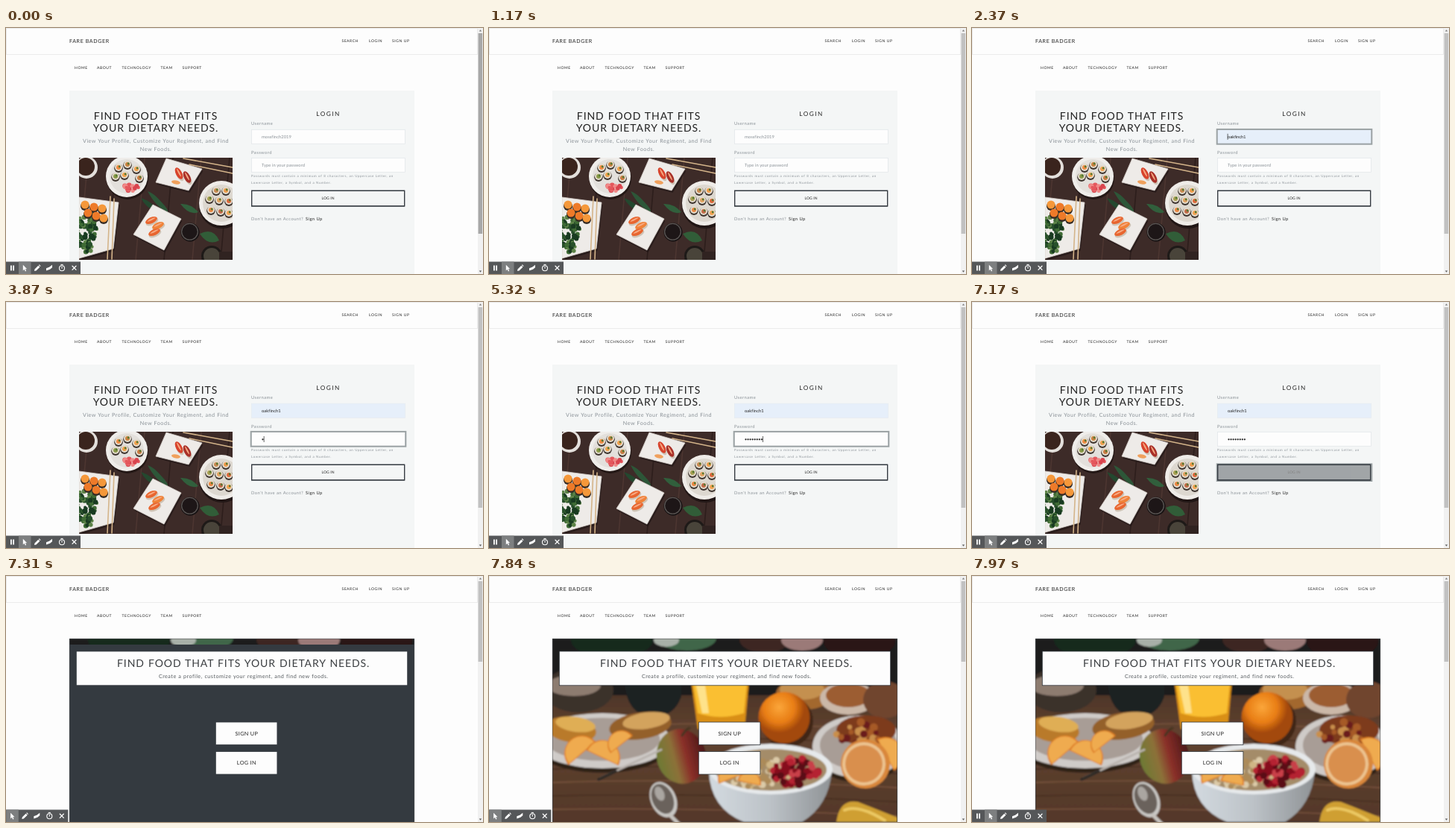
Recreate the animation shown at these times as an HTML page. Size 640x330 px, loop 8 s.

```html
<!DOCTYPE html>
<html lang="en">
<head>
<meta charset="utf-8">
<title>Login demo</title>
<style>
  html, body { margin: 0; width: 100%; height: 100%; overflow: hidden; background: #fdfdfd; }
  svg { display: block; width: 640px; height: 330px; }
  text { font-family: Lato, "Open Sans", sans-serif; fill: #222; white-space: pre; text-rendering: geometricPrecision; }
  .brand { font-size: 7px; letter-spacing: .65px; }
  .nav { font-size: 5px; letter-spacing: .56px; }
  .head { font-size: 14px; letter-spacing: .92px; word-spacing: .5px; }
  .lead { font-size: 7.2px; letter-spacing: .47px; word-spacing: .4px; }
  .title { font-size: 8.2px; letter-spacing: 1.5px; }
  .label { font-size: 5.8px; letter-spacing: .45px; }
  .field { font-size: 5.8px; letter-spacing: .06px; }
  .help { font-size: 4.4px; letter-spacing: .58px; word-spacing: .25px; }
  .small { font-size: 5px; letter-spacing: .1px; }
  .button { font-size: 7.2px; letter-spacing: .35px; }
  .preview { font: 5.7px "Liberation Sans", Arial, sans-serif; }
  .gray { fill: #899096; }
  .mid { text-anchor: middle; }
</style>
</head>
<body>
<svg id="stage" viewBox="0 0 640 330" xmlns="http://www.w3.org/2000/svg"></svg>
<script>
const rect = (x, y, w, h, fill, more = '') => `<rect x="${x}" y="${y}" width="${w}" height="${h}" fill="${fill}" ${more}/>`;
const disc = (x, y, r, fill, more = '') => `<circle cx="${x}" cy="${y}" r="${r}" fill="${fill}" ${more}/>`;
const oval = (x, y, rx, ry, fill, turn = 0) =>
  `<ellipse cx="${x}" cy="${y}" rx="${rx}" ry="${ry}" fill="${fill}" transform="rotate(${turn} ${x} ${y})"/>`;
const path = (d, fill, more = '') => `<path d="${d}" fill="${fill}" ${more}/>`;
const line = (d, color, width) => path(d, 'none', `stroke="${color}" stroke-width="${width}" stroke-linecap="round"`);
const text = (x, y, cls, s, more = '') => `<text x="${x}" y="${y}" class="${cls}" ${more}>${s}</text>`;
const group = (id, body, more = '') => `<g id="${id}" ${more}>${body}</g>`;
const repeat = (n, draw) => Array.from({ length: n }, (_, i) => draw(i)).join('');

function seeded(seed) {
  return () => (seed = (seed * 16807) % 2147483647) / 2147483647;
}

// Random blobs inside an ellipse, for greens, berries and crumbs.
function scatter(n, x, y, rx, ry, size, colors, seed) {
  const rnd = seeded(seed);
  return repeat(n, i => {
    const a = rnd() * 6.283, d = Math.sqrt(rnd());
    return disc((x + rx * d * Math.cos(a)).toFixed(1), (y + ry * d * Math.sin(a)).toFixed(1),
      (size * (.6 + .6 * rnd())).toFixed(1), colors[i % colors.length]);
  });
}

const roll = (x, y, core) =>
  disc(x, y + 1.2, 5.8, '#3d342f') + disc(x, y, 5, '#e4dccd') + disc(x, y, 3, core) + disc(x + 1.2, y - 1, 1.4, '#557a35');
const nigiri = (x, y, turn, color) =>
  oval(x + 1, y + 2, 9, 4.2, '#cfc4b6', turn) + oval(x, y, 8.5, 4, color, turn) + oval(x, y - 1, 6, 1, '#f6a982', turn);

function sushiPhoto() {
  const stick = d => line(d, '#d4b48a', 1.6);
  const plate = d => path(d, '#1e1514', 'transform="translate(1.5 3)" opacity=".6"') + path(d, '#eeebe8', 'stroke="#d7d1cc" stroke-width=".8"');
  return rect(98, 174, 206, 137, '#3d2b28') +
    repeat(6, i => line(`M${110 + i * 38} 174L${98 + i * 38} 311`, i % 2 ? '#2d1e1c' : '#4d3631', 1.6)) +
    disc(108, 187, 15, '#e3dfdb') + disc(107, 186, 12, '#3a241d') +
    disc(163, 202, 28, '#241816') + disc(162, 199, 28, '#efedea') + disc(162, 199, 23, '#e3e0dc') +
    roll(151, 187, '#ef8b42') + roll(163, 183, '#c9823f') + roll(175, 189, '#f0a04e') +
    roll(147, 199, '#8b9a4a') + roll(159, 197, '#efa14b') + roll(179, 201, '#c97b42') +
    scatter(16, 168, 214, 10, 5, 3, ['#e4575c', '#f08a88', '#d9444e'], 7) +
    plate('M215 175L263 189L245 218L201 207Z') +
    nigiri(232, 195, 62, '#d8432c') + nigiri(243, 200, 62, '#a93029') + oval(228, 207, 6, 2.5, '#f0a05c', 10) +
    stick('M238 175L304 187') + stick('M246 183L304 195') +
    path('M190 219Q198 221 209 234Q218 243 217 247Q201 240 190 219Z', '#2d5638') +
    path('M181 228Q194 232 206 245L200 246Q187 240 181 228Z', '#24482f') +
    path('M234 236Q248 235 258 247Q246 252 234 236Z', '#315f3c') +
    disc(290, 238, 31, '#211615') + disc(289, 235, 30, '#efece8') + disc(289, 235, 25, '#ddd8d0') +
    roll(282, 218, '#c98a52') + roll(295, 218, '#ef9c4c') + roll(273, 229, '#a7a052') +
    roll(286, 231, '#e1a261') + roll(299, 232, '#dc693c') + roll(275, 244, '#ea8742') +
    roll(288, 246, '#c36b48') + roll(299, 248, '#f1a251') +
    plate('M98 227L151 234L144 296L98 309Z') +
    scatter(80, 109, 274, 14, 28, 3.2, ['#28502b', '#3f6b35', '#193b21', '#5d8348'], 31) +
    [[106, 237], [118, 240], [129, 242], [121, 252], [131, 255], [110, 248]].map(([x, y], i) =>
      disc(x, y + 2, 6, '#342a24') + disc(x, y, 5.5, i % 2 ? '#ee7a29' : '#f5983a')).join('') +
    plate('M197 237L235 256L212 298L171 277Z') +
    nigiri(195, 258, -25, '#e8652f') + nigiri(204, 265, -25, '#f08238') + nigiri(199, 274, -25, '#e8652f') +
    stick('M140 226L136 310') + stick('M145 229L142 310') +
    disc(247, 274, 12.5, '#151112') + disc(246.5, 273.3, 11.5, '#5b5654') + disc(246.5, 273.3, 10.2, '#1d1617') +
    path('M260 276Q278 267 286 285Q271 293 260 276Z', '#315d38') +
    disc(276, 306, 14, '#1e1a18') + disc(276, 306, 11, '#49443a') +
    rect(286, 300, 18, 11, '#302321');
}

function breakfastPhoto() {
  const platter = (x, y, rx, ry) => oval(x, y + 6, rx, ry, '#2e2019') + oval(x, y, rx, ry, '#cfcbc8') + oval(x, y - 2, rx * .84, ry * .78, '#a89d96');
  const slice = (x, y, r, turn) =>
    `<g transform="translate(${x} ${y}) rotate(${turn})">` +
    path(`M${-r} 0A${r} ${r} 0 0 1 ${r} 0Z`, '#dd7a20') + path(`M${2 - r} -1A${r - 3} ${r - 3} 0 0 1 ${r - 2} -1Z`, '#efab50') + '</g>';
  return rect(85, 84, 463, 246, 'url(#wood)') +
    repeat(9, i => line(`M85 ${205 + i * 18}Q300 ${190 + i * 20} 548 ${208 + i * 19}`, i % 2 ? '#442b1e' : '#7b553d', 1.3)) +
    rect(85, 84, 463, 76, '#1f1b1a') +
    oval(165, 86, 55, 24, '#14291d') + oval(265, 84, 40, 16, '#3f6649') + oval(238, 86, 17, 9, '#a8b0a8') +
    oval(370, 85, 34, 18, '#3c2622') + oval(420, 86, 28, 14, '#9b7a78') + oval(497, 87, 48, 25, '#2a1418') +
    oval(120, 153, 47, 30, '#3b302a') + oval(114, 147, 36, 14, '#8d7c70') +
    path('M181 140H258V162Q248 190 218 189Q185 187 181 140Z', '#1f2021') +
    oval(424, 158, 39, 21, '#a3682f') + oval(420, 152, 30, 14, '#c4904f') +
    oval(482, 164, 38, 22, '#cbb8a8') + oval(482, 160, 30, 16, '#9c5d33') +
    oval(531, 166, 29, 25, '#6f442f') +
    platter(152, 221, 92, 37) +
    oval(110, 206, 34, 17, '#b97a2c', 8) + oval(116, 199, 27, 10, '#dfae55', 8) +
    oval(203, 201, 42, 18, '#94602c', -8) + oval(211, 194, 32, 11, '#d3a35d', -8) +
    slice(125, 238, 24, -40) + slice(152, 244, 24, 25) + slice(178, 226, 19, -38) +
    path('M271 140H349L343 206Q309 218 280 205Z', '#d98f16') +
    path('M274 145H346L342 184Q310 194 280 184Z', '#fabf30') + path('M278 147H290L295 184H286Z', '#fee28b') +
    disc(400, 195, 35, '#3f2618') + disc(396, 190, 34.5, 'url(#orange)') +
    oval(258, 242, 33, 37, 'url(#apple)', -15) + line('M259 214Q264 206 269 204', '#473422', 3) +
    line('M150 271L231 233', '#b9b3ae', 3) + line('M147 273L170 262', '#2f2b28', 4) +
    platter(496, 229, 62, 42) +
    oval(506, 207, 40, 20, '#7d3a1f') + scatter(22, 498, 210, 33, 15, 5, ['#a65a26', '#c98f4c', '#6b1d1a'], 17) +
    slice(532, 240, 24, 62) + disc(505, 252, 33, '#d9873a') + disc(503, 252, 29, '#ecc491') + disc(503, 252, 25, '#d98f4e') +
    path('M295 262Q297 312 342 330H420Q456 308 460 262Z', 'url(#bowl)') +
    oval(378, 259, 83, 34, '#e6e9eb') + oval(378, 260, 75, 28, '#a48c69') +
    scatter(120, 358, 263, 50, 20, 4, ['#cfb585', '#ac8a58', '#dccaa8'], 53) +
    slice(325, 272, 18, -22) + slice(349, 278, 16, 12) +
    scatter(55, 411, 262, 31, 19, 5, ['#860f1f', '#b52330', '#5a0d17', '#c93f48'], 91) +
    oval(234, 300, 17, 25, '#c9c7c4', -24) + oval(233, 299, 14, 21, '#6a625c', -24) + oval(229, 292, 6, 10, '#aaa6a1', -24) +
    line('M243 321L256 334', '#c6c2bd', 5) +
    path('M467 325Q472 299 495 303L548 324V330H466Z', '#cf9f31') + line('M477 314Q496 306 531 328', '#ecc964', 4);
}

function scrollbar(id, height, color) {
  return rect(633, 0, 7, 330, '#f1f1f1') + path('M634.8 4.5h3.4l-1.7-2.3z', '#777') + path('M634.8 325.5h3.4l-1.7 2.3z', '#555') +
    rect(633.6, 7, 5.6, height, color, `id="${id}"`);
}

function header() {
  const links = [[450.4, 'SEARCH'], [487, 'LOGIN'], [518, 'SIGN UP']];
  const menu = [[92, 'HOME'], [122, 'ABOUT'], [155.5, 'TECHNOLOGY'], [207.5, 'TEAM'], [236.6, 'SUPPORT']];
  return rect(.5, .5, 632, 35, '#fdfdfd', 'stroke="#ebebeb" stroke-width="1"') +
    text(85, 20, 'brand', 'FARE BADGER') +
    links.map(([x, s]) => text(x, 19.4, 'nav', s)).join('') +
    menu.map(([x, s]) => text(x, 54.5, 'nav', s)).join('');
}

const field = y => rect(329.5, y, 206, 19, '#fdfdfd', 'stroke="#e3e7ea" stroke-width=".8"');
const ring = (id, y, h) => rect(328.7, y, 207.6, h, 'none', `id="${id}" stroke="#9ba2a4" stroke-width="2"`);
const caret = (id, x, y) => rect(x, y, .7, 8, '#222', `id="${id}"`);

function loginPage() {
  return rect(85, 84, 463, 246, '#f4f6f6') +
    text(201, 123.3, 'head mid', 'FIND FOOD THAT FITS') +
    text(201, 139.3, 'head mid', 'YOUR DIETARY NEEDS.') +
    text(201, 153.7, 'lead gray mid', 'View Your Profile, Customize Your Regiment, and Find') +
    text(201, 164.6, 'lead gray mid', 'New Foods.') +
    `<g clip-path="url(#sushiClip)"><g filter="url(#fine)">${sushiPhoto()}</g></g>` +
    text(432.6, 118.4, 'title mid', 'LOGIN') +
    text(329, 130.4, 'label gray', 'Username') + field(136.3) +
    text(343, 147.8, 'field gray', 'mossfinch2019', 'id="userHint"') +
    group('filled', rect(329.5, 136.3, 206, 19, '#e6effa')) +
    text(343, 147.8, 'preview', 'oakfinch1', 'id="userPreview"') +
    text(343, 147.8, 'field', 'oakfinch1', 'id="userValue"') +
    ring('userRing', 135.9, 19.8) + caret('userCaret', 342.7, 141.8) +
    text(329, 168.6, 'label gray', 'Password') + field(174.3) +
    text(343, 185.8, 'field gray', 'Type in your password', 'id="passHint"') +
    group('dots', repeat(8, i => disc(344.5 + i * 3.05, 184.3, 1.15, '#222'))) +
    ring('passRing', 173.9, 19.8) + caret('passCaret', 343, 180) +
    text(329, 200.2, 'help gray', 'Passwords must contain a minimum of 8 characters, an Uppercase Letter, an') +
    text(329, 208.8, 'help gray', 'Lowercase Letter, a Symbol, and a Number.') +
    ring('buttonRing', 217.4, 22.6) +
    rect(329.6, 218.3, 205, 20.6, '#f4f6f6', 'stroke="#343a40" stroke-width="1.2"') +
    text(432, 230.3, 'small mid', 'LOG IN') +
    group('hovered', rect(329.6, 218.3, 205, 20.6, '#343a40') +
      text(432, 230.3, 'small mid', 'LOG IN', 'style="fill:#fff"')) +
    rect(329.6, 218.3, 205, 20.6, 'none', 'stroke="#343a40" stroke-width="1.2"') +
    text(329, 258, 'label gray', "Don't have an Account?") + text(402, 258, 'label', 'Sign Up') +
    scrollbar('loginThumb', 269, '#c1c1c1');
}

function homePage() {
  const box = (x, y, w, h) => rect(x, y, w, h, '#fdfdfd', 'stroke="#343a40" stroke-width=".8"');
  return rect(85, 84, 463, 246, '#343a40') +
    `<g clip-path="url(#homeClip)"><g filter="url(#soft)">${breakfastPhoto()}</g></g>` +
    path('M85.3 330V84.3H547.7V330', 'none', 'stroke="#4a4d4f" stroke-width=".6"') +
    box(94.3, 101, 444.4, 45.8) +
    text(318.7, 122.3, 'head mid', 'FIND FOOD THAT FITS YOUR DIETARY NEEDS.', 'style="fill:#3c3f42"') +
    text(318.7, 136.8, 'lead mid', 'Create a profile, customize your regiment, and find new foods.', 'style="fill:#555a5e"') +
    box(281.3, 196, 82.6, 30.3) + text(322.8, 213.8, 'button mid', 'SIGN UP') +
    box(281.3, 235.5, 82.6, 30.5) + text(322.8, 253.4, 'button mid', 'LOG IN') +
    scrollbar('homeThumb', 108, '#c1c1c1');
}

function toolbar() {
  return rect(0, 313.5, 100, 16.5, '#555759') +
    rect(17, 313.5, 16.5, 16.5, '#7d7f80') +
    rect(6, 318.5, 1.8, 7, '#fff') + rect(9.2, 318.5, 1.8, 7, '#fff') +
    path('M22.8 317.8V325.5L24.6 323.8L25.9 326.6L27.2 326L25.9 323.3H28.2Z', '#fff') +
    path('M38 326L38.5 323.5L43.3 318.7L45.4 320.8L40.5 325.6ZM43.9 318L44.8 317.3L46.6 319.2L45.9 320.1Z', '#fff') +
    path('M54 325.5V322.2L58 320.8L62 317.7V321.2L59 323.8Z', '#fff') +
    `<circle cx="75" cy="322.3" r="3.5" fill="none" stroke="#fff" stroke-width="1.1"/>` +
    line('M73.8 317.4H76.2M75 322.3V320.3', '#fff', 1) +
    line('M89 319.3L94 324.4M94 319.3L89 324.4', '#fff', 1.3);
}

const defs = `<defs>
  <clipPath id="sushiClip"><rect x="98" y="174" width="206" height="137"/></clipPath>
  <clipPath id="homeClip"><rect id="loaded" x="85" y="84" width="463" height="8"/></clipPath>
  <filter id="fine"><feGaussianBlur stdDeviation=".5"/></filter>
  <filter id="soft"><feGaussianBlur stdDeviation="1.2"/></filter>
  <linearGradient id="wood" x2="0" y2="1"><stop stop-color="#33241d"/><stop offset=".5" stop-color="#5f412f"/><stop offset="1" stop-color="#54382a"/></linearGradient>
  <linearGradient id="bowl"><stop stop-color="#d3dae0"/><stop offset=".5" stop-color="#bcc2c7"/><stop offset="1" stop-color="#8f9396"/></linearGradient>
  <radialGradient id="orange" cx=".4" cy=".3"><stop stop-color="#fba63a"/><stop offset=".6" stop-color="#e87d14"/><stop offset="1" stop-color="#a3480c"/></radialGradient>
  <linearGradient id="apple"><stop stop-color="#6d7a34"/><stop offset=".35" stop-color="#8c7139"/><stop offset=".6" stop-color="#8a3029"/><stop offset="1" stop-color="#4b1718"/></linearGradient>
</defs>`;

document.getElementById('stage').innerHTML = defs + rect(0, 0, 640, 330, '#fdfdfd') + header() +
  group('login', loginPage()) + group('home', homePage()) + group('toolbar', toolbar());

const LOOP = 8000;
const keyTimes = [3870, 4030, 4200, 4370, 4540, 4890, 5100, 5320];
const el = Object.fromEntries([...document.querySelectorAll('#stage [id]')].map(e => [e.id, e]));
const dots = [...el.dots.children];
const show = (e, on) => { e.style.opacity = +on; };

// The recording shows each fade in three held steps.
const fade = (t, from, to) => {
  const steps = Math.floor((t - from) / (to - from) * 2) + 1;
  return Math.min(3, Math.max(0, steps)) / 3;
};

function render(t) {
  const onHome = t >= 7310;
  el.login.style.display = onHome ? 'none' : '';
  el.home.style.display = onHome ? '' : 'none';

  show(el.userHint, t < 2370);
  show(el.filled, t >= 2370);
  show(el.userPreview, t >= 2370 && t < 2750);
  show(el.userValue, t >= 2750);
  show(el.userCaret, t >= 1710 && t < 2750);
  show(el.userRing, fade(t, 1710, 2010) - fade(t, 3120, 3410));

  const typed = keyTimes.filter(k => t >= k).length;
  dots.forEach((d, i) => show(d, i < typed));
  show(el.passHint, typed === 0);
  show(el.passCaret, t >= 3120 && t < 6290);
  el.passCaret.setAttribute('x', 342.7 + typed * 3.05);
  show(el.passRing, fade(t, 3120, 3410) - fade(t, 6290, 6630));

  // Hover darkens the button; it is fading back when the page changes.
  show(el.hovered, fade(t, 5950, 6290) - (t >= 6920 ? .25 : 0) - (t >= 7170 ? .32 : 0));
  show(el.buttonRing, fade(t, 6290, 6630));

  el.loginThumb.setAttribute('fill', t < 500 ? '#a8a8a8' : '#c1c1c1');
  el.loaded.setAttribute('height', t < 7840 ? 8 : 246);
  el.toolbar.setAttribute('transform', `translate(${t >= 7310 && t < 7970 ? -16.7 : 0} 0)`);
}

const start = performance.now();
function tick() {
  render((performance.now() - start) % LOOP);
  requestAnimationFrame(tick);
}
tick();
</script>
</body>
</html>
```
